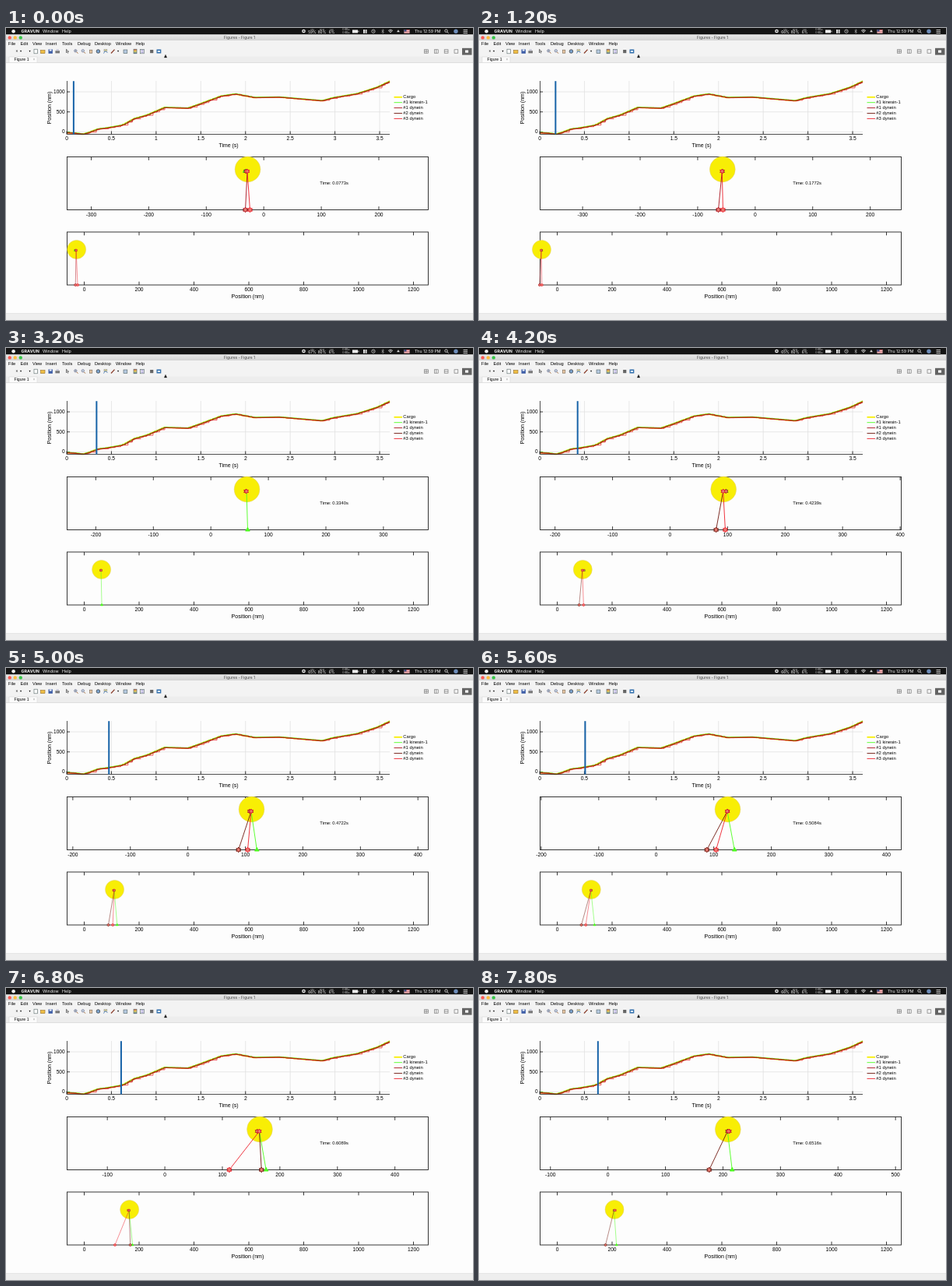
An HTML page with a canvas for the animation above (8 s loop, 600x375 px).

```html
<!DOCTYPE html>
<html lang="en">
<head>
<meta charset="utf-8">
<title>Cargo transport figure</title>
<style>
html, body { margin: 0; width: 100%; height: 100%; overflow: hidden; background: #fdfdfd; }
canvas { display: block; width: 600px; height: 375px; }
</style>
</head>
<body>
<canvas id="stage"></canvas>
<script>
const canvas = document.getElementById('stage');
const ratio = window.devicePixelRatio || 1;
canvas.width = 600 * ratio;
canvas.height = 375 * ratio;
const g = canvas.getContext('2d');
g.scale(ratio, ratio);

const LOOP = 8000, STEP = 200, LATTICE = 8;
const PLOT_FONT = '"Liberation Sans", Arial, sans-serif';
const MENU_FONT = 'Inter, Roboto, sans-serif';
const GREEN = '#4dff1f', YELLOW = '#f8ee05', INK = '#222', GRID = '#dedede';

// Playback ms -> simulated seconds
const clock = [[0, .0773], [1200, .1772], [2200, .2441], [4200, .4239], [5600, .5084], [6800, .6089], [7800, .6516]];

// Simulated seconds -> cargo nm; drives both the chart and the moving cargo
const course = [
  [0, -20], [.0773, -28], [.177, -57], [.244, -12], [.35, 76], [.424, 93], [.508, 124],
  [.609, 165], [.652, 209], [.75, 330], [.89, 417], [1.09, 610], [1.35, 592], [1.5, 709],
  [1.72, 893], [1.88, 945], [2.09, 858], [2.37, 868], [2.85, 777], [2.98, 854],
  [3.24, 951], [3.35, 1029], [3.47, 1116], [3.613, 1266]
];

// Each binding: from ms, to ms, first nm, last nm
const motors = [
  { name: '#1 kinesin-1', color: GREEN, bindings: [[2200, 3500, -2, 88], [5000, 8000, 116, 222]] },
  { name: '#1 dynein', color: '#a8101c', bindings: [[0, 1300, -32, -66], [1300, 2300, -64, -64]] },
  { name: '#2 dynein', color: '#70180f', bindings: [[3400, 6000, 75, 91], [6400, 8000, 164, 178]] },
  { name: '#3 dynein', color: '#ee202c', bindings: [[0, 1300, -24, -58], [3600, 7000, 92, 113]] }
];

const mix = (a, b, u) => a + (b - a) * u;

function sample(points, x) {
  const found = points.findIndex(p => p[0] >= x);
  const i = found < 0 ? points.length - 1 : Math.max(1, found);
  const [a, b] = [points[i - 1], points[i]];
  return mix(a[1], b[1], (x - a[0]) / (b[0] - a[0]));
}

function footAt(motor, ms) {
  const bound = motor.bindings.find(([from, to]) => ms >= from && ms < to);
  if (!bound) return null;
  const [from, to, first, last] = bound;
  return LATTICE * Math.round(mix(first, last, (ms - from) / (to - from)) / LATTICE);
}

function stateAt(ms) {
  const seconds = sample(clock, ms);
  const feet = motors.map(m => footAt(m, ms));
  const bound = feet.filter(f => f !== null);
  return {
    seconds, feet,
    cargo: sample(course, seconds),
    drift: -4 * Math.cos(2 * Math.PI * ms / 1700) ** 3,
    cpu: Math.round(66 - 7 * Math.cos(ms / 760) * Math.exp(-ms / 2500)),
    center: (Math.min(...bound) + Math.max(...bound)) / 2
  };
}

function rect(x, y, w, h, color) {
  g.fillStyle = color;
  g.fillRect(x, y, w, h);
}

function frame(x, y, w, h, color = INK, width = 1) {
  g.strokeStyle = color;
  g.lineWidth = width;
  g.strokeRect(x, y, w, h);
}

function line(points, color = INK, width = 1) {
  g.strokeStyle = color;
  g.lineWidth = width;
  g.beginPath();
  points.forEach(p => g.lineTo(...p));
  g.stroke();
}

function disc(x, y, r, fill, stroke, width = .7) {
  g.beginPath();
  g.arc(x, y, r, 0, 7);
  if (fill) { g.fillStyle = fill; g.fill(); }
  if (stroke) { g.strokeStyle = stroke; g.lineWidth = width; g.stroke(); }
}

function text(s, x, y, size = 6.7, align = 'center', color = '#000', font = PLOT_FONT, weight = '') {
  g.font = `${weight} ${size}px ${font}`;
  g.textAlign = align;
  g.textBaseline = 'middle';
  g.fillStyle = color;
  g.fillText(s, x, y);
}

function polygon(x, y, corners, radius, fill, stroke, width) {
  g.beginPath();
  for (let i = 0; i < corners; i++) {
    const angle = i * 2 * Math.PI / corners - Math.PI / 2, r = radius(i);
    g.lineTo(x + r * Math.cos(angle), y + r * Math.sin(angle));
  }
  g.closePath();
  g.fillStyle = fill;
  g.fill();
  g.strokeStyle = stroke;
  g.lineWidth = width;
  g.stroke();
}

function marker(motor, x, y, r) {
  const { color } = motors[motor];
  if (motor === 0) polygon(x, y, 3, () => r, color, color, .5);
  else polygon(x, y, 12, i => i % 2 ? r * .58 : r, '#ea7c72', color, r / 3.6);
}

function menuBar(s) {
  rect(0, 0, 600, 8.5, '#141414');
  disc(9.6, 4.2, 2.3, '#eee');
  const label = (t, x, weight, size = 5.4) => text(t, x, 4.4, size, 'left', '#f4f4f4', MENU_FONT, weight);
  label('GRAVUN', 19.5, 'bold');
  label('Window', 47);
  label('Help', 72);
  disc(382.5, 4, 2.3, '#eee');
  rect(381.6, 3.1, 1.8, 1.8, '#333');
  [['CPU', s.cpu], ['MEM', 80], ['SSD', 6]].forEach(([name, value], i) => {
    const x = 393.5 + i * 12.5;
    text(name, x, 1.8, 2.4, 'center', '#ccc', MENU_FONT);
    text(value + '%', x, 5.7, 4.8, 'center', '#fff', MENU_FONT);
  });
  [2.3, 6].forEach(y => text('0 KB/s', 437, y, 3, 'center', '#ddd', MENU_FONT));
  rect(445, 2.4, 7, 4, '#eee');
  rect(452.5, 3.5, .9, 1.8, '#eee');
  [459, 461.6].forEach(x => rect(x, 2, 2, 4.8, '#ddd'));
  disc(472, 4.2, 2.2, null, '#ddd');
  line([[472, 2.8], [472, 4.4], [473, 4.8]], '#ddd', .5);
  line([[482.5, 2.9], [485.5, 5.5], [484, 6.8], [484, 1.7], [485.5, 3], [482.5, 5.6]], '#ccc', .5);
  for (let r = 1.2; r < 5; r += 1.5) {
    g.beginPath();
    g.arc(494, 6.5, r, -2.35, -.79);
    g.strokeStyle = '#eee';
    g.lineWidth = .8;
    g.stroke();
  }
  polygon(504, 4.2, 3, () => 1.8, '#ddd', '#ddd', .3);
  rect(511.5, 2, 7, 4.8, '#eee');
  for (let i = 0; i < 3; i++) rect(511.5, 2 + i * 1.8, 7, .8, '#c8343c');
  rect(511.5, 2, 3, 2.5, '#35477d');
  label('Thu 12:59 PM', 525, '', 5.2);
  disc(565.5, 3.6, 1.7, null, '#eee', .8);
  line([[566.8, 4.9], [568.5, 6.7]], '#eee', .8);
  disc(578, 4.2, 2.7, '#6d8cb8');
  for (let y = 2; y < 7; y += 2) rect(587.5, y, 5.5, .8, '#eee');
}

function toolbar() {
  const glass = (x, sign) => {
    disc(x - .7, 29.3, 1.7, '#d6e8f4', '#668', .7);
    line([[x + .7, 30.8], [x + 2.4, 32.6]], '#a16a38');
    text(sign, x - .7, 29.3, 3.3);
  };
  const boxed = (x, y, w, h, fill, edge = '#566') => {
    rect(x, y, w, h, fill);
    frame(x, y, w, h, edge, .6);
  };
  text('✕', 14, 30, 4);
  [19, 30.5, 144].forEach(x => text('▾', x, 30, 4.2));
  boxed(36, 27.2, 4.4, 5.6, '#fff');
  boxed(44.5, 28.6, 5.5, 4, '#edbd43', '#99702a');
  rect(54.5, 27.4, 5.4, 5.4, '#3f5fa8');
  rect(55.8, 27.4, 2.8, 2.2, '#e8edf5');
  rect(63.4, 29.2, 5.6, 3.2, '#777');
  rect(64.5, 27.2, 3.4, 2, '#ccd');
  line([[77.5, 32], [77.5, 27.4], [80.5, 30.3], [78.8, 30.5], [79.6, 32.6]], '#333', .7);
  glass(90, '+');
  glass(99.5, '-');
  boxed(107.3, 28.2, 3.5, 4, '#e9c8a4', '#765');
  disc(118.4, 30, 2.3, '#7ba3cd', '#333', .7);
  boxed(126, 27.5, 3.8, 2.6, '#ead98a', '#999');
  line([[125.5, 32.7], [127.5, 29], [130.5, 32]], '#3d75b5', .8);
  line([[135, 32.5], [139.5, 27.6]], '#8b402e', 1.3);
  boxed(151, 28, 4.8, 4.6, '#b4c8df');
  const stripes = g.createLinearGradient(0, 27, 0, 33);
  ['#d85248', '#e5d75c', '#3d70b8'].forEach((c, i) => stripes.addColorStop(i / 2, c));
  boxed(164, 27.2, 4, 5.6, stripes);
  boxed(172.6, 27.4, 5, 5.4, '#fff');
  for (let y = 28.6; y < 32.5; y += 1.5) line([[173.5, y], [176.7, y]], '#8278c0', .7);
  rect(185.1, 28, 4.2, 4.2, '#666');
  rect(193.5, 27.5, 5.8, 5, '#3471ad');
  rect(194.8, 29, 3.2, 2, '#e2edf6');

  rect(586, 25.8, 12.5, 8.8, '#636363');
  rect(590, 28.5, 4, 3.2, '#fff');
  for (let i = 0; i < 4; i++) {
    const x = 540 + i * 12.8;
    frame(x - 2.4, 27.8, 4.8, 4.4, '#666', .6);
    if (i < 2) line([[x, 27.8], [x, 32.2]], '#666', .6);
    if (i % 2 === 0) line([[x - 2.4, 30], [x + 2.4, 30]], '#666', .6);
  }
}

function windowChrome(s) {
  menuBar(s);
  const title = g.createLinearGradient(0, 8.5, 0, 16);
  title.addColorStop(0, '#e8e8e8');
  title.addColorStop(1, '#d3d3d3');
  rect(0, 8.5, 600, 7.5, title);
  ['#fb5a53', '#fcbc3d', '#37c648'].forEach((c, i) => disc(4.8 + i * 7, 12.4, 2.2, c));
  text('Figures - Figure 1', 300, 12.6, 4.9, 'center', '#444', MENU_FONT);
  rect(0, 16, 600, 21, '#f3f3f3');
  [['File', 3], ['Edit', 18.5], ['View', 34], ['Insert', 51], ['Tools', 72], ['Debug', 92],
    ['Desktop', 114], ['Window', 141], ['Help', 166.5]]
    .forEach(([name, x]) => text(name, x, 20, 5.7, 'left'));
  toolbar();
  rect(0, 36.5, 600, 8, '#ededed');
  rect(0, 44, 600, .6, '#cfcfcf');
  rect(4, 37, 36, 7.6, '#fbfbfb');
  frame(4, 37, 36, 7.4, '#d4d4d4', .5);
  text('Figure 1', 10.5, 40.6, 5.2, 'left');
  text('×', 36, 40.6, 5, 'center', '#999');
  rect(0, 366.5, 600, 8.5, '#eeeeee');
  rect(0, 366.2, 600, .5, '#d5d5d5');
  polygon(205, 37, 3, i => i ? 2 : 2.8, '#111', '#111', .3);
}

const chartX = t => 78 + t * 114.87;
const chartY = nm => 133.5 - nm * .0515;

// Staircase that holds its level for `hold` seconds, with slightly uneven treads
function trace(color, width, shift, hold) {
  const points = [];
  const level = t => chartY(sample(course, t)) + shift;
  for (let n = 0, t = 0; t < 3.61; n++) {
    const next = Math.min(3.613, t + hold * (1 + .6 * Math.sin(n * 2.3)));
    points.push([chartX(t), level(t)], [chartX(next), level(t)]);
    t = next;
  }
  line(points, color, width);
}

function chart(s) {
  for (let t = .5; t <= 3.5; t += .5) line([[chartX(t), 68], [chartX(t), 136]], GRID, .7);
  [0, 500, 1000].forEach(v => {
    const y = chartY(v);
    line([[78, y], [493, y]], GRID, .7);
    line([[78, y], [82, y]], INK, .9);
    text(v, 75.5, y, 6.5, 'right');
  });
  trace(YELLOW, 1.7, 0, .01);
  trace(GREEN, .7, -.6, .02);
  trace(motors[2].color, .6, .1, .025);
  trace(motors[3].color, .7, .4, .045);
  trace(motors[1].color, .7, .1, .015);
  line([[78.5, 68], [78.5, 136.5], [493, 136.5]], INK, .8);
  for (let t = 0; t <= 3.5; t += .5) {
    line([[chartX(t), 136.5], [chartX(t), 132.5]], INK, .9);
    text(t, chartX(t), 142.2);
  }
  rect(chartX(s.seconds) - 1, 68.2, 2, 68.3, '#1763a8');
  text('Time (s)', 286, 151.4, 6.9);
  g.save();
  g.translate(56, 102.5);
  g.rotate(-Math.PI / 2);
  text('Position (nm)', 0, 0, 7.1);
  g.restore();

  [{ name: 'Cargo', color: YELLOW }, ...motors].forEach(({ name, color }, i) => {
    const y = 88.8 + i * 6.9;
    line([[498.5, y], [509, y]], color, i ? .9 : 1.8);
    text(name, 510.3, y, 5.85, 'left');
  });
}

function track(s, { top, zero, scale, spacing, cargoY, radius, headY, size, legWidth }) {
  const left = 78.5, right = 542.5, bottom = top + 68, x = nm => zero + nm * scale;
  frame(left, top, right - left, 68, INK, .9);
  for (let v = -600; v <= 1200; v += spacing) {
    const tx = x(v);
    if (tx < left || tx > right) continue;
    line([[tx, top], [tx, top + 4.3]], INK, .9);
    line([[tx, bottom], [tx, bottom - 4.3]], INK, .9);
    text(v, tx, bottom + 6.2);
  }
  const cargoX = x(s.cargo);
  disc(cargoX, cargoY, radius, YELLOW, '#e2cc70', .5);
  const heads = s.feet.map((foot, motor) => {
    if (foot === null) return cargoX + s.drift * (1 - motor * .2) * size / 3.4;
    line([[x(foot), bottom], [cargoX - .5, headY]], motors[motor].color, legWidth);
    marker(motor, x(foot), bottom, size);
    return cargoX - .5;
  });
  heads.forEach((headX, motor) => marker(motor, headX, headY, size * .85));
}

function draw(ms) {
  const s = stateAt(ms);
  rect(0, 0, 600, 375, '#fdfdfd');
  chart(s);
  track(s, {
    top: 165.5, zero: 310.5 - s.center * .739, scale: .739, spacing: 100,
    cargoY: 181.5, radius: 16.4, headY: 184, size: 3.4, legWidth: .9
  });
  text(`Time: ${s.seconds.toFixed(4)}s`, 403.3, 199.3, 5.8, 'left');
  track(s, {
    top: 262, zero: 100.5, scale: .3525, spacing: 200,
    cargoY: 284.5, radius: 12, headY: 285.5, size: 1.9, legWidth: .5
  });
  text('Position (nm)', 310.5, 344.6, 7.1);
  windowChrome(s);
}

const start = performance.now();
function tick() {
  const ms = (performance.now() - start) % LOOP;
  draw(Math.floor(ms / STEP) * STEP);
  requestAnimationFrame(tick);
}
tick();
</script>
</body>
</html>
```
